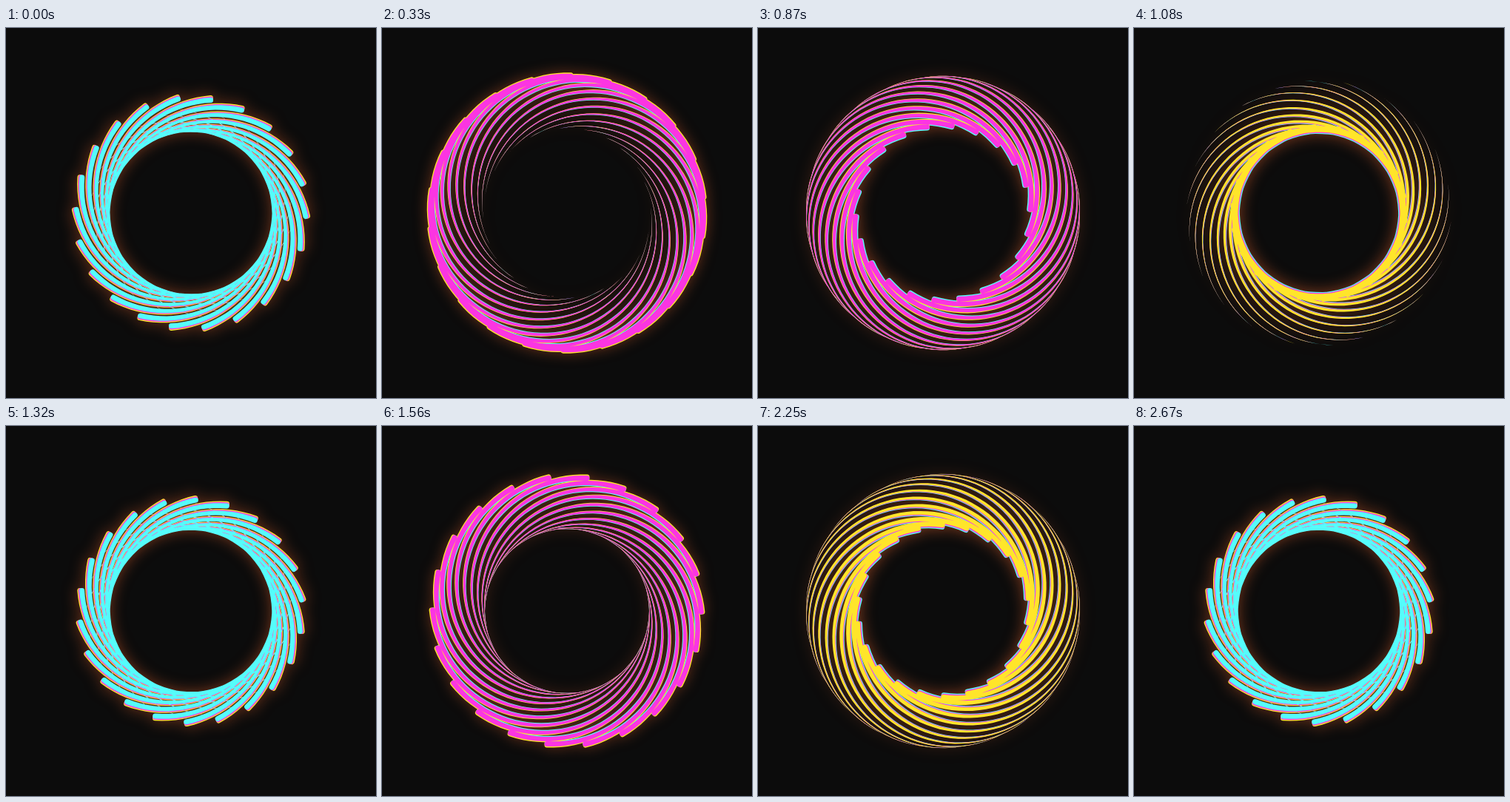
An HTML page with a canvas for the animation above (2700 ms loop, 500 by 500 pixels).

```html
<!DOCTYPE html>
<html>
<head>
<meta charset="utf-8">
<style>
  html, body { margin: 0; height: 100%; overflow: hidden; background: #0c0c0c; }
  canvas { display: block; }
</style>
</head>
<body>
<canvas id="stage" width="500" height="500"></canvas>
<script>
const ctx = document.getElementById('stage').getContext('2d');
const STRANDS = 22, PERIOD = 45, FRAME = 30;
const RADIUS = 148, SHIFT = 37;          // each strand runs on an off-centre circle
const HEAD_WIDTH = 7, TRAIL = 2.95, STEPS = 48;
const RAD = Math.PI / 180;

const cyan = { color: '#55fdfb', side: -1 };
const magenta = { color: '#fb35e2', side: 0 };
const yellow = { color: '#ffe52a', side: 1 };

// Layers from back to front
function layersAt(step) {
  if (step >= 7 && step < 30) return [cyan, yellow, magenta];
  if (step >= 30 && step < 39) return [cyan, magenta, yellow];
  return [yellow, magenta, cyan];
}

// One tapered arc with a round head
function addStrand(head, side) {
  const edge = (i, sign) => {
    const u = i / STEPS;
    const width = HEAD_WIDTH * u ** 1.3;
    const angle = head - TRAIL * (1 - u);
    const r = RADIUS + width * (side * 0.2 + sign / 2);
    return [SHIFT + r * Math.cos(angle), r * Math.sin(angle)];
  };
  ctx.moveTo(...edge(0, 1));
  for (let i = 1; i <= STEPS; i++) ctx.lineTo(...edge(i, 1));
  const r = RADIUS + HEAD_WIDTH * side * 0.2;
  ctx.arc(SHIFT + r * Math.cos(head), r * Math.sin(head), HEAD_WIDTH / 2, head, head + Math.PI);
  for (let i = STEPS; i >= 0; i--) ctx.lineTo(...edge(i, -1));
  ctx.closePath();
}

function fillLayer({ color, side }, head) {
  ctx.save();
  ctx.translate(250, 250);
  ctx.rotate(6.5 * RAD);
  ctx.beginPath();
  for (let i = 0; i < STRANDS; i++) {
    addStrand(head, side);
    ctx.rotate(2 * Math.PI / STRANDS);
  }
  ctx.fillStyle = color;
  ctx.fill();
  ctx.restore();
}

function draw(now) {
  const step = Math.floor(now / FRAME) % PERIOD;
  const head = (step * 360 / PERIOD - 84) * RAD;
  ctx.fillStyle = '#0c0c0c';
  ctx.fillRect(0, 0, 500, 500);
  layersAt(step).forEach((layer, i) => {
    ctx.shadowColor = i ? 'transparent' : 'rgba(255, 110, 50, 0.55)';
    ctx.shadowBlur = i ? 0 : 20;
    fillLayer(layer, head);
  });
}

const start = performance.now();
(function loop() {
  draw(performance.now() - start);
  requestAnimationFrame(loop);
})();
</script>
</body>
</html>
```
